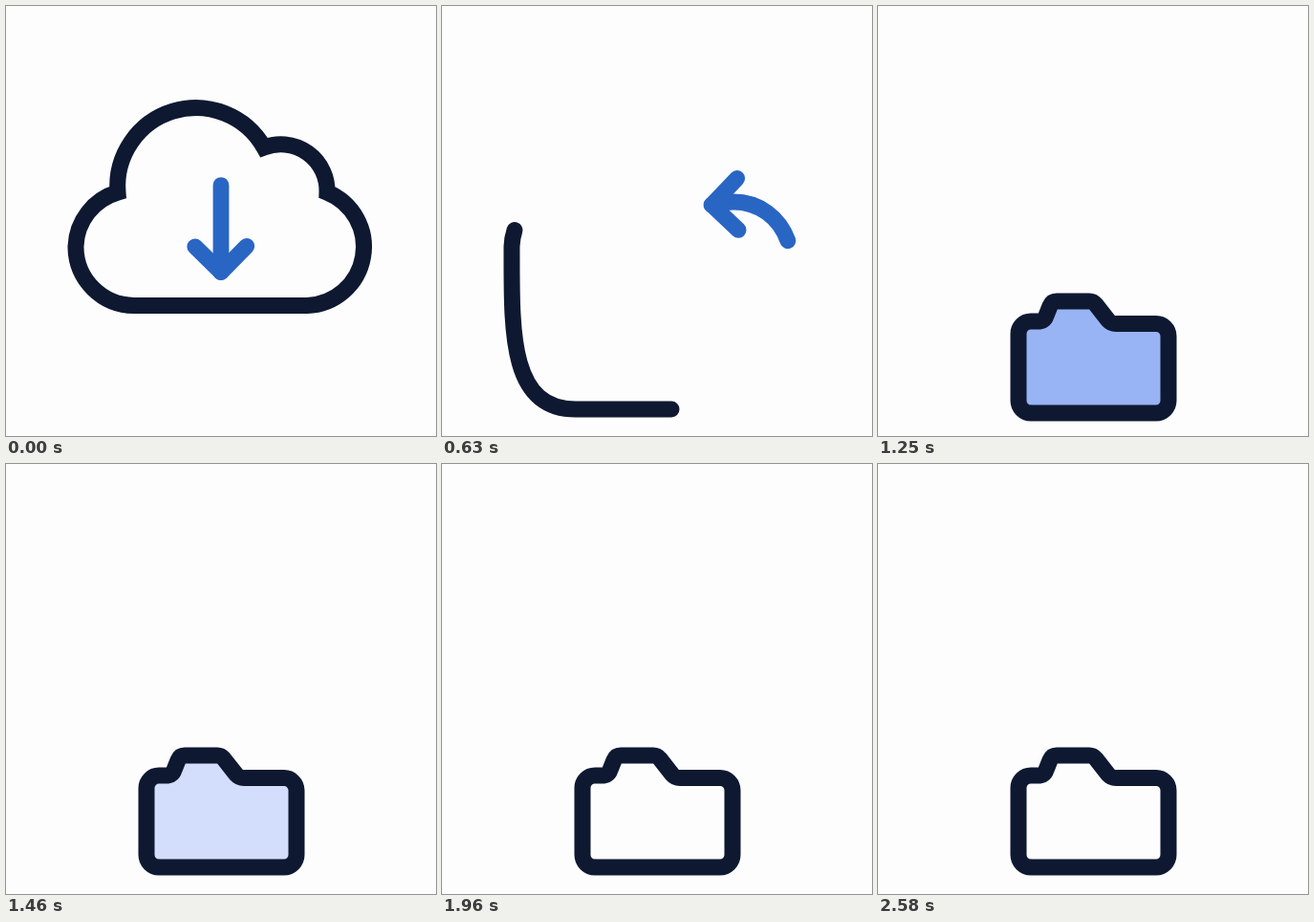
Recreate the animation shown at these times as an HTML page. Size 450 by 450 pixels, loop 2.62 s.

```html
<!DOCTYPE html>
<html lang="en">
<head>
<meta charset="utf-8">
<title>Cloud download</title>
<style>
  html, body { margin: 0; width: 100%; height: 100%; overflow: hidden; background: #fdfdfe; }
  svg { display: block; width: 100vw; height: 100vh; }
  path { fill: none; stroke-linecap: round; }
  .arrow { stroke: #2966c4; stroke-width: 16.8; stroke-linejoin: round; }
  #line { stroke: #0e1931; stroke-width: 17; stroke-miterlimit: 8; }
  #fill { fill: #98b4f5; }
</style>
</head>
<body>
<svg viewBox="0 0 450 450">
  <g id="arrow">
    <path id="shaft" class="arrow"/>
    <path id="head" class="arrow" d="M-27-27L0 0L-27 27"/>
  </g>
  <g id="box">
    <path id="fill"/>
    <path id="line"/>
  </g>
</svg>
<script>
const LOOP = 2620;
const SHAFT = 91;
const $ = id => document.getElementById(id);
const [arrow, shaft, head, box, fill, line] =
  ['arrow', 'shaft', 'head', 'box', 'fill', 'line'].map($);

const cloud = 'M73 251.5A61.5 61.5 0 0 0 134 313.5H315A61.5 61.5 0 0 0 336 195' +
  'A48.5 48.5 0 0 0 270 148A82 82 0 0 0 117 195A61 61 0 0 0 73 251.5';
const approach = 'C73 340 70 422 140 422H160';
const folder = 'H291A13 13 0 0 0 304 409V341.5A13 13 0 0 0 291 328.5H249Q244 328.5 241 325' +
  'L228 308.5Q225 305 221 305H187Q182 305 180 310L176 320Q174 326 167 326H160' +
  'A13 13 0 0 0 147 339V409A13 13 0 0 0 160 422';
const flight = 'M225 187V277C225 322 250 349 288 349C330 349 366 312 366 270' +
  'C366 233 340 205 305 205C262 205 225 238 225 282V385';

function measure(path, d) {
  path.setAttribute('d', d);
  return path.getTotalLength();
}
const cloudLength = measure(line, cloud);
const folderStart = measure(line, cloud + approach);
const lineLength = measure(line, cloud + approach + folder);
const flightLength = measure(shaft, flight);
fill.setAttribute('d', 'M160 422' + folder + 'Z');

const clamp = x => Math.min(1, Math.max(0, x));
const ramp = (t, from, to) => clamp((t - from) / (to - from));
const smooth = x => x * x * (3 - 2 * x);
const pulse = (t, a, b, c, d) => smooth(ramp(t, a, b)) * (1 - smooth(ramp(t, c, d)));

// Shows only the part of a path between two lengths.
function trim(path, from, to) {
  path.style.strokeDasharray = `${to - from} 9999`;
  path.style.strokeDashoffset = -from;
}

function draw(t) {
  const tail = folderStart * Math.sin(ramp(t, 0, 1126) * Math.PI / 2);
  const lead = cloudLength + (lineLength - cloudLength) * ramp(t, 330, 1050);
  trim(line, tail, lead);

  // The shaft stretches slightly as the arrow sets off.
  const reach = SHAFT + 7 * ramp(t, 0, 250);
  const travel = Math.min(t * 0.547, flightLength - reach);
  const tip = travel + reach;
  trim(shaft, travel, tip);
  const p = shaft.getPointAtLength(tip);
  // The head turns a little late, more so towards the end.
  const back = shaft.getPointAtLength(tip - 1 - 92 * (travel / flightLength) ** 1.4);
  const angle = Math.atan2(p.y - back.y, p.x - back.x) * 180 / Math.PI;
  head.setAttribute('transform', `translate(${p.x} ${p.y}) rotate(${angle})`);
  arrow.style.opacity = 1 - ramp(t, 1010, 1110);

  fill.style.opacity = pulse(t, 1040, 1150, 1290, 1600);
  box.setAttribute('transform', `translate(0 ${4 * pulse(t, 1060, 1200, 1270, 1480)})`);
}

const start = performance.now();
function tick() {
  draw((performance.now() - start) % LOOP);
  requestAnimationFrame(tick);
}
tick();
</script>
</body>
</html>
```
